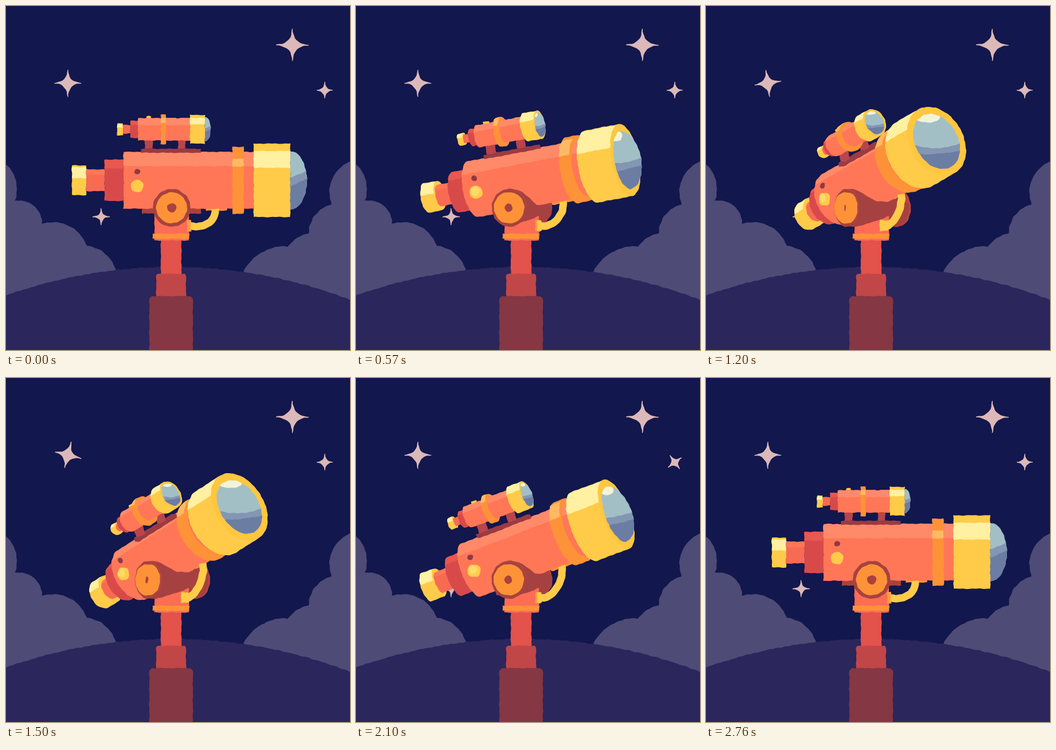
An HTML page with a canvas that plays this animation: 600x600 px, repeating every 2790 ms.

```html
<!DOCTYPE html>
<html lang="en">
<head>
<meta charset="utf-8">
<title>Telescope</title>
<style>
html, body { margin: 0; width: 100%; height: 100%; overflow: hidden; background: #12174d; }
canvas { display: block; width: 600px; height: 600px; }
</style>
</head>
<body>
<canvas id="stage" width="600" height="600"></canvas>
<script>
const ctx = document.getElementById('stage').getContext('2d');
const LOOP = 2790, STEP = 30, TAU = Math.PI * 2, DEG = Math.PI / 180;
const CX = 289, CY = 352;
const { sin, cos, sqrt, max, min, hypot } = Math;

const C = {
  sky: '#12174d', cloud: '#4e4b77', hill: '#2b265b', star: '#dcb9b8',
  yellow: '#ffcb49', cream: '#fff0a2', rim: '#ffc63f',
  orange: '#fd9238', amber: '#ffb964',
  coral: '#ff7757', blush: '#ff8a69', tube: '#f86b53',
  red: '#d84a4a', rose: '#e8584e', brick: '#b8454b', wine: '#a8423f', dark: '#a64141'
};

// Time, yaw and pitch (degrees)
const YAW = [[0, 0], [270, 6.5], [840, 37], [1200, 50.6], [1770, 37.5], [2400, 9.6], [LOOP, 0]];
const PITCH = [[0, 0], [270, 2.8], [840, 16.3], [1200, 20], [1770, 24.8], [2400, 12.1], [LOOP, 0]];
const SPIN_A = [[740, 0], [840, -12], [1200, -98], [1650, -180]];
const SPIN_C = [[1560, 0], [1770, -45], [2400, -200], [2700, -270]];

// Smooth curve through keys, flat at both ends
function curve(keys, t) {
  const last = keys.length - 1;
  if (t <= keys[0][0]) return keys[0][1];
  if (t >= keys[last][0]) return keys[last][1];
  const slope = i => i === 0 || i === last ? 0 :
    (keys[i + 1][1] - keys[i - 1][1]) / (keys[i + 1][0] - keys[i - 1][0]);
  let i = 0;
  while (t > keys[i + 1][0]) i++;
  const [t0, v0] = keys[i], [t1, v1] = keys[i + 1];
  const d = t1 - t0, u = (t - t0) / d, u2 = u * u, u3 = u2 * u;
  return v0 * (2 * u3 - 3 * u2 + 1) + v1 * (3 * u2 - 2 * u3) +
    d * (slope(i) * (u3 - 2 * u2 + u) + slope(i + 1) * (u3 - u2));
}

// Hand-cut edges
const wobble = (x, y) => [
  x + 0.35 * sin(y * 0.47 + x * 0.13) + 0.3 * sin(y * 0.21 - x * 0.31),
  y + 0.35 * sin(x * 0.43 - y * 0.17) + 0.3 * sin(x * 0.19 + y * 0.23)
];

function trace(pts, closed = true) {
  ctx.beginPath();
  const n = closed ? pts.length : pts.length - 1;
  for (let i = 0; i < n; i++) {
    const [x0, y0] = pts[i], [x1, y1] = pts[(i + 1) % pts.length];
    const k = Math.ceil(hypot(x1 - x0, y1 - y0) / 4) || 1;
    for (let j = 0; j < k; j++) {
      ctx.lineTo(...wobble(x0 + (x1 - x0) * j / k, y0 + (y1 - y0) * j / k));
    }
  }
  if (closed) ctx.closePath();
  else ctx.lineTo(...wobble(...pts[n]));
}

function fill(pts, color) {
  trace(pts);
  ctx.fillStyle = color;
  ctx.fill();
}

function sweep(n, f, a = 0, b = TAU) {
  const out = [];
  for (let i = 0; i <= n; i++) out.push(f(a + (b - a) * i / n));
  return out;
}

const oval = (x, y, rx, ry = rx) => sweep(60, a => [x + rx * cos(a), y + ry * sin(a)]);
const rect = (x0, y0, x1, y1) => [[x0, y0], [x1, y0], [x1, y1], [x0, y1]];

function hull(pts) {
  const p = pts.slice().sort((a, b) => a[0] - b[0] || a[1] - b[1]);
  const half = list => {
    const h = [];
    for (const q of list) {
      while (h.length > 1) {
        const [a, b] = h.slice(-2);
        if ((b[0] - a[0]) * (q[1] - a[1]) - (b[1] - a[1]) * (q[0] - a[0]) > 0) break;
        h.pop();
      }
      h.push(q);
    }
    h.pop();
    return h;
  };
  return half(p).concat(half(p.reverse()));
}

// Current pose
let yaw, pitch, sy, cy, sp, cp, edge;

function pose(t) {
  yaw = curve(YAW, t) * DEG;
  pitch = curve(PITCH, t) * DEG;
  sy = sin(yaw); cy = cos(yaw);
  sp = sin(pitch); cp = cos(pitch);
  edge = Math.atan2(sp * sy, cy);
}

const turn = (x, y, z = 0) => [CX + x * cy - z * sy, CY + y];
const place = (x, y, z = 0) => turn(x * cp + y * sp, y * cp - x * sp, z);

const ring = (x, y, r) => sweep(48, a => place(x, y - r * cos(a), r * sin(a)));
const disc = (x, y, z, r) => sweep(40, a => place(x + r * cos(a), y + r * sin(a), z));

function barrel(x0, x1, y, r, color, light, a0, a1) {
  fill(hull([...ring(x0, y, r), ...ring(x1, y, r)]), color);
  if (!light) return;
  // Turning away brings the light up to the outline
  const from = max(a0 * DEG - yaw, edge), to = a1 * DEG;
  if (from >= to) return;
  const side = x => sweep(12, a => place(x, y - r * cos(a), r * sin(a)), from, to);
  fill([...side(x0), ...side(x1).reverse()], light);
}

function puck(x, y, z0, z1, r, color) {
  fill(hull([...disc(x, y, z0, r), ...disc(x, y, z1, r)]), color);
}

function box(x0, x1, y0, y1, d, color, map = place) {
  const pts = [];
  for (const x of [x0, x1]) for (const y of [y0, y1]) for (const z of [-d, d]) pts.push(map(x, y, z));
  fill(hull(pts), color);
}

function lens(x, y, r, depth) {
  const d = depth * cy ** 4, g = r / 51, k = min(1, sy * 1.3);
  const pts = [];
  for (let q = 0; q <= 8; q++) {
    const a = q / 8 * Math.PI / 2;
    pts.push(...ring(x + d * sin(a), y, r * cos(a)));
  }
  const [px, py] = place(x, y);
  const w = g * (30 + 14 * k);
  ctx.save();
  trace(hull(pts));
  ctx.fillStyle = '#a2bfc6';
  ctx.fill();
  ctx.clip();
  const below = (drop, sag, color) => {
    const l = g * (8 - 4 * k + drop), m = g * (-17 + 19 * k + drop * 0.75);
    const top = sweep(16, u => [px - w + 2 * w * u, py + l + (m - l) * u + 4 * g * sag * u * (1 - u)], 0, 1);
    fill([...top, [px + w + 9, py + 70], [px - w - 9, py + 70]], color);
  };
  below(0, 9 * k, '#8396b2');
  below(18, 3 * k, '#6c7da3');
  if (k > 0.3) fill(oval(px - 16 * g, py - 42 * g, 22 * g * k, 9 * g), '#f3f3d9');
  ctx.restore();
}

function star(x, y, r, deg = 0) {
  const pts = [];
  for (let i = 0; i < 4; i++) {
    const a = deg * DEG + i * TAU / 4, b = a + TAU / 4, m = a + TAU / 8;
    for (let j = 0; j < 10; j++) {
      const u = j / 10, p = (1 - u) * (1 - u), q = 2 * u * (1 - u) * 0.05, s = u * u;
      pts.push([x + r * (p * cos(a) + q * cos(m) + s * cos(b)),
                y + r * (p * sin(a) + q * sin(m) + s * sin(b))]);
    }
  }
  fill(pts, C.star);
  ctx.strokeStyle = C.star;
  ctx.lineWidth = 1.4;
  ctx.lineJoin = 'round';
  ctx.stroke();
}

function scenery(t) {
  ctx.fillStyle = C.sky;
  ctx.fillRect(0, 0, 600, 600);
  star(108, 134.5, 23, curve(SPIN_A, t));
  star(499.5, 68, 27.5);
  star(556, 147, 14, curve(SPIN_C, t));
  star(166, 367.5, 14);

  for (const [x, y, r] of [
    [-41, 320, 60], [22, 380, 41], [82, 440, 63], [135, 477, 59],
    [622, 325, 58], [580, 397, 52], [540, 455, 60], [486, 500, 81]
  ]) fill(oval(x, y, r), C.cloud);
  fill([[-5, 320], [12, 342], [50, 400], [130, 440], [150, 520], [-5, 520]], C.cloud);
  fill([[605, 320], [580, 350], [545, 420], [500, 440], [480, 530], [605, 530]], C.cloud);
  const ridge = sweep(90, a => [290 + 866 * cos(a), 1321 + 866 * sin(a)], -2.02, -1.12);
  fill([...ridge, [670, 610], [-90, 610]], C.hill);
}

function post() {
  fill(rect(270, 400, 306, 472), '#e3524b');
  fill([[264, 467], [311, 467], [314, 471], [314, 510], [262, 510], [262, 470]], '#c14647');
  fill([[254, 506], [322, 506], [326, 510], [326, 606], [250, 606], [250, 510]], '#853743');
  fill(rect(259, 352, 319, 409), '#fc6d54');
  fill(rect(256, 397, 320, 406), C.orange);
}

function finder() {
  const y = -137;
  box(-53, 51, -103, -96, 5, '#9c3a42');
  box(-47, -33, -120, -103, 5, C.brick);
  box(11, 24, -120, -103, 5, C.brick);
  barrel(-95, -85, y, 10.5, C.yellow, C.cream, 30, 75);
  barrel(-85, -72, y, 7.5, C.tube);
  barrel(-72, -59, y, 15, C.red, C.rose, 0, 60);
  box(-44, -36, -160, -154, 4, C.yellow);
  barrel(-59, 33, y, 19.5, C.coral, C.blush, 0, 68);
  barrel(-19, -10, y, 26, C.orange, C.amber, 40, 65);
  barrel(-10, 33, y, 19.5, C.coral, C.blush, 0, 68);
  barrel(32, 58, y, 25, C.yellow, C.cream, 37, 70);
  fill(ring(58, y, 25), C.rim);
  lens(58, y, 21, 10);
}

// The part of the axle that stands out of the tube
function axle() {
  const near = [], far = [];
  for (let i = 0; i <= 36; i++) {
    const b = (-90 + i * 5) * DEG + pitch;
    const x = 33 * cos(b), y = 33 * sin(b);
    const z = y < 1.5 ? sqrt(max(0, 49.5 ** 2 - (y + 48) ** 2)) : -57;
    near.push(place(x, y, 57));
    far.push(place(x, y, z));
  }
  fill([...near, ...far.reverse()], C.dark);
}

function wheel() {
  fill(disc(0, 0, 57, 33), C.wine);
  puck(0, 0, 54, 62, 27, C.orange);
  const [x, y] = place(0, 0, 60);
  fill(oval(x, y, 8 * cos(yaw * 1.6), 8 - 2.6 * sy), C.wine);
}

// Front of the cradle that holds the axle
function cradle() {
  fill([[259, 386], [282, 379], [304, 373], [319, 366], [319, 397], [259, 397]], '#fc6d54');
}

function hook() {
  box(27, 34, 21, 41, 3, '#ff9c3e', turn);
  box(33, 34, 22, 40, 9, C.yellow, turn);
  const a = turn(33, 32), b = turn(60, 35), c = place(76, 24, -7), d = place(76, 2, -7);
  const mix = (i, u) => {
    const v = 1 - u;
    return v * v * v * a[i] + 3 * v * v * u * b[i] + 3 * v * u * u * c[i] + u * u * u * d[i];
  };
  trace(sweep(24, u => [mix(0, u), mix(1, u)], 0, 1), false);
  ctx.strokeStyle = C.yellow;
  ctx.lineWidth = 13;
  ctx.stroke();
}

function telescope() {
  const y = -48;
  puck(0, 0, -62, -50, 32, '#b8473f');
  puck(0, 0, -52, 57, 32, C.dark);
  box(-52, 51, -3, 10, 5, C.wine);
  box(60, 97, -4, 5, 6, C.orange);

  barrel(-174, -149, y, 26, C.yellow, C.cream, 28, 82);
  barrel(-149, -117, y, 19, C.tube, C.coral, 0, 60);
  barrel(-117, -84, y, 36, C.red, C.rose, 0, 55);
  barrel(-84, 143, y, 49.5, C.coral, C.blush, 0, 60);
  puck(-60, -63, 46, 48, 5, '#8f3a44');
  puck(-60, -38, 46, 53, 11, C.yellow);
  if (sy > 0.3) fill(disc(-60, -40, 53, 8), '#ffda6a');

  finder();

  barrel(106, 126, y, 58.5, C.orange, C.amber, 50, 66);
  barrel(126, 143, y, 49.5, C.coral, C.blush, 0, 60);
  barrel(143, 207, y, 64, C.yellow, C.cream, 37, 70);
  fill(ring(207, y, 64), C.rim);
  lens(207, y, 51, 29);

  axle();
  cradle();
  wheel();
  hook();
}

const start = performance.now();
function draw() {
  const t = Math.floor((performance.now() - start) % LOOP / STEP) * STEP;
  pose(t);
  scenery(t);
  post();
  telescope();
  requestAnimationFrame(draw);
}
draw();
</script>
</body>
</html>
```
